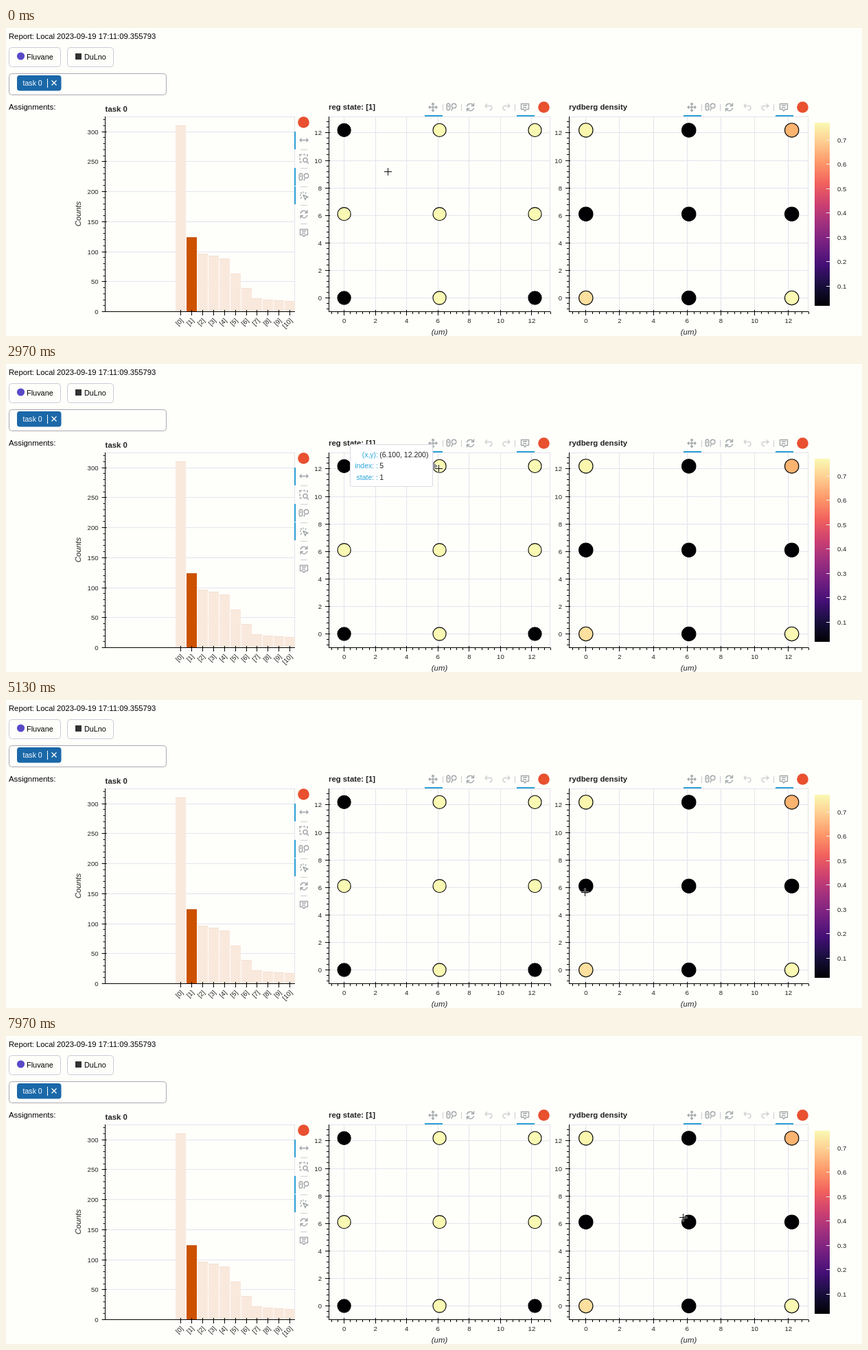
An HTML page with a canvas that plays this animation: 1247 by 449 pixels, repeating every 8 s.

```html
<!DOCTYPE html>
<html lang="en">
<head>
<meta charset="utf-8">
<title>Task report</title>
<style>
html, body { margin: 0; width: 100%; height: 100%; overflow: hidden; background: #fefefb; }
canvas { display: block; }
</style>
</head>
<body>
<canvas id="stage" width="1247" height="449"></canvas>
<script>
const ctx = document.getElementById('stage').getContext('2d');
const LOOP = 8000, BG = '#fefefb', INK = '#000', LABEL = '#222', GRID = '#e3e3ec', ICON = '#a1a6a9', BLUE = '#2b9fd6';
const YELLOW = '#faf9b4', BLACK = '#010003';
const TOP = 129, BASE = 413.5;
const COUNTS = [310, 124, 97, 93, 89, 64, 40, 22, 20, 19, 18];
const MAGMA = ['#000004', '#180f3d', '#440f76', '#721f81', '#9e2f7f', '#cd4071', '#f1605d', '#fd9668', '#feca8d', '#faf9b4'];
const SITES = [0, 6.1, 12.2];

// Colours run column by column, each from the bottom up.
const register = { x0: 470, x1: 793, zero: 492.6, unit: 22.78, r: 9.6, title: 'reg state: [1]', tools: 622,
  fills: [BLACK, YELLOW, BLACK, YELLOW, YELLOW, YELLOW, BLACK, YELLOW, YELLOW] };
const density = { x0: 820, x1: 1169, zero: 844.8, unit: 24.58, r: 10.2, title: 'rydberg density', tools: 999,
  fills: ['#fddf9f', BLACK, '#faf6ae', BLACK, BLACK, BLACK, YELLOW, BLACK, '#fbb370'] };

// Pointer stops: time, x, y
const STOPS = [[0, 557, 210], [30, 557, 210], [800, 492, 271], [1500, 492, 271], [2500, 631, 153], [3300, 631, 153],
  [4130, 631, 287], [4300, 631, 287], [5130, 844, 281], [5900, 844, 279], [6930, 968, 166], [7970, 987, 265], [8000, 987, 265]];

const yOf = v => 393.5 - v * 20.05;
const countY = v => BASE - v * 0.875;

function text(s, x, y, size = 11.25, color = INK, align = 'left', style = '') {
  ctx.font = `${style} ${size}px "Liberation Sans", Arial, sans-serif`;
  ctx.fillStyle = color;
  ctx.textAlign = align;
  ctx.fillText(s, x, y);
}

function line(color, width, ...p) {
  ctx.strokeStyle = color;
  ctx.lineWidth = width;
  ctx.beginPath();
  for (let i = 0; i < p.length; i += 2) ctx.lineTo(p[i], p[i + 1]);
  ctx.stroke();
}

const snap = v => Math.floor(v) + 0.5;
const hLine = (color, x0, x1, y) => line(color, 1, x0, snap(y), x1, snap(y));
const vLine = (color, x, y0, y1) => line(color, 1, snap(x), y0, snap(x), y1);

function disc(x, y, r, fill, stroke) {
  ctx.beginPath();
  ctx.arc(x, y, r, 0, 7);
  ctx.fillStyle = fill;
  ctx.fill();
  if (stroke) { ctx.strokeStyle = stroke; ctx.lineWidth = 1.1; ctx.stroke(); }
}

function box(x, y, w, h, r, stroke, fill) {
  ctx.beginPath();
  ctx.roundRect(x, y, w, h, r);
  if (fill) { ctx.fillStyle = fill; ctx.fill(); }
  if (stroke) { ctx.strokeStyle = stroke; ctx.lineWidth = 1; ctx.stroke(); }
}

const ICONS = {
  pan: 'M-6 0H6M0-6V6M-4-2L-6 0L-4 2M4-2L6 0L4 2M-2-4L0-6L2-4M-2 4L0 6L2 4',
  xpan: 'M-6 0H6M-3.5-2.5L-6 0L-3.5 2.5M3.5-2.5L6 0L3.5 2.5',
  zoomBox: 'M-6-3V-6H-3M-1-6H2M4-6H5V-3M-6-1V2M-6 4V5H-3M5 2A3 3 0 1 1-1 2A3 3 0 1 1 5 2M4 4L7 7',
  wheel: 'M-4.5-5.5A2.3 2.3 0 0 1-2.2-3V2A2.3 2.3 0 0 1-6.8 2V-3A2.3 2.3 0 0 1-4.5-5.5M-4.5-3V0M6.8-2A3.2 3.2 0 1 1 .4-2A3.2 3.2 0 1 1 6.8-2M1.5 1L0 5',
  tap: 'M-1-1L6 2L3 3L2 6ZM-1-6V-4M-6-1H-4M-5-5L-3-3M3-5L2-3M-5 4L-3 2',
  reset: 'M-5-1A5 5 0 0 1 4-3M5-6V-2H1M5 1A5 5 0 0 1-4 3M-5 6V2H-1',
  undo: 'M-2-5L-5-2L-2 1M-5-2H2A3 3 0 0 1 2 4H1',
  redo: 'M2-5L5-2L2 1M5-2H-2A3 3 0 0 0-2 4H-1',
  hover: 'M-5.5-5H5.5V3H2L0 5.5L-2 3H-5.5ZM-3-2.5H3M-3 .5H2'
};
for (const k in ICONS) ICONS[k] = new Path2D(ICONS[k]);

function icon(name, x, y, color = ICON) {
  ctx.save();
  ctx.translate(x, y);
  ctx.strokeStyle = color;
  ctx.lineWidth = 1.4;
  ctx.lineJoin = 'round';
  ctx.stroke(ICONS[name]);
  ctx.restore();
}

function header() {
  text('Report: Local 2023-09-19 17:11:09.355793', 4, 15.5);
  box(4.5, 28.5, 75, 28, 4, '#cbcbd8');
  disc(21.5, 41, 5.6, '#5a4ac8');
  text('Fluvane', 30, 46, 10.9);
  box(89.5, 28.5, 67, 28, 4, '#cbcbd8');
  box(101, 37, 9, 9, 0, null, '#333');
  text('DuLno', 114, 46, 10.8);
  box(4.5, 66.5, 229, 31, 4, '#aaaab2');
  box(16, 69, 64.5, 22.5, 4, null, '#1b68a9');
  text('task 0', 24.5, 83.5, 10.6, '#fff');
  vLine('#fff', 60, 74, 87);
  line('#fff', 1.2, 66.5, 76.5, 73.5, 83.5);
  line('#fff', 1.2, 73.5, 76.5, 66.5, 83.5);
  text('Assignments:', 4, 118.5, 11.4);
}

function valueAxis(x, low, high, minor, toY) {
  vLine(INK, x, TOP, BASE);
  for (let i = Math.ceil(low / minor); i * minor <= high; i++) {
    const y = toY(i * minor), major = i % 5 === 0;
    hLine(INK, x - (major ? 5 : 3), x + (major ? 2 : 0), y);
    if (major) text(i * minor, x - 10, y + 3.5, 9.6, LABEL, 'right');
  }
}

function histogram() {
  const x0 = 144.6, x1 = 421;
  text('task 0', x0, 122, 11.35, LABEL, 'left', 'bold');
  for (let v = 50; v <= 300; v += 50) hLine(GRID, x0, x1, countY(v));
  hLine(GRID, x0, x1, TOP);
  vLine(GRID, x1 - 1, TOP, BASE);
  COUNTS.forEach((n, i) => {
    const x = Math.round(247 + 15.92 * i), y = Math.round(countY(n));
    ctx.fillStyle = i === 1 ? '#cc5200' : '#f9e9dd';
    ctx.fillRect(x, y, Math.min(15, x1 - x), BASE - y);
    if (i !== 1) hLine('#f5dfd0', x, Math.min(x + 15, x1), y);
  });
  valueAxis(x0, 0, 325, 10, countY);
  hLine(INK, x0, x1, BASE);
  COUNTS.forEach((_, i) => {
    const x = 254.5 + 15.92 * i;
    vLine(INK, x, 411, 419);
    ctx.save();
    ctx.translate(x + 3, 426);
    ctx.rotate(-Math.PI / 4);
    text(`[${i}]`, 0, 1.5, 9.6, LABEL, 'right');
    ctx.restore();
  });
  ctx.save();
  ctx.translate(109, 271);
  ctx.rotate(-Math.PI / 2);
  text('Counts', 0, 0, 11.6, LABEL, 'center', 'italic');
  ctx.restore();

  disc(433.5, 137.5, 8.3, '#e8502f');
  ['xpan', 'zoomBox', 'wheel', 'tap', 'reset', 'hover'].forEach((name, i) => {
    icon(name, 434, 163.5 + 27 * i);
    if (i) hLine('#d0d0d4', 429, 439, 150 + 27 * i);
  });
  for (const [y0, y1] of [[151, 177], [204, 230], [231, 257]]) line(BLUE, 2, 421, y0, 421, y1);
}

function toolbar(x) {
  const y = 115.5;
  [['pan', 0], ['wheel', 27], ['reset', 54.5], ['undo', 81], ['redo', 107], ['hover', 134]].forEach(([name, dx]) =>
    icon(name, x + dx, y, /undo|redo/.test(name) ? '#cfd2d3' : ICON));
  for (const dx of [14, 41, 119]) vLine('#ccccd0', x + dx, 111, 121);
  for (const dx of [-12, 122]) line(BLUE, 2, x + dx, 128, x + dx + 26, 128);
  disc(x + 161.5, y, 8.3, '#e8502f');
}

function lattice(p) {
  const xOf = v => p.zero + v * p.unit;
  text(p.title, p.x0, 119, 11.35, LABEL, 'left', 'bold');
  for (let v = 0; v <= 12; v += 2) {
    hLine(GRID, p.x0, p.x1, yOf(v));
    vLine(GRID, xOf(v), TOP, BASE);
  }
  hLine(GRID, p.x0, p.x1, TOP);
  vLine(GRID, p.x1 - 1, TOP, BASE);
  valueAxis(p.x0, -1, 13.2, 0.4, yOf);
  hLine(INK, p.x0, p.x1, BASE);
  for (let i = -2; i <= 33; i++) {
    const x = xOf(i * 0.4), major = i % 5 === 0;
    vLine(INK, x, major ? 411 : BASE, major ? 419 : 417);
    if (major) text(i * 0.4, x, 430, 9.6, LABEL, 'center');
  }
  text('(um)', (p.x0 + p.x1) / 2, 447, 11.35, LABEL, 'center', 'italic');
  p.fills.forEach((fill, i) =>
    disc(xOf(SITES[i / 3 | 0]), yOf(SITES[i % 3]), p.r, fill, '#000'));
  toolbar(p.tools);
}

function colorBar() {
  const g = ctx.createLinearGradient(0, 405, 0, 138);
  MAGMA.forEach((c, i) => g.addColorStop(i / 9, c));
  ctx.fillStyle = g;
  ctx.fillRect(1178, 138, 22, 267);
  for (let i = 1; i < 8; i++) {
    const y = 411.7 - 35.5 * i;
    hLine('#eee', 1195, 1200, y);
    text((i / 10).toFixed(1), 1211, y + 3.5, 9.6, LABEL);
  }
}

function tooltip(i) {
  const sx = SITES[i / 3 | 0], sy = SITES[i % 3];
  const x = register.zero + sx * register.unit, y = yOf(sy);
  const num = v => v ? v.toFixed(3) : '0';
  const coords = `(${num(sx)}, ${num(sy)})`;
  ctx.font = '10.5px "Liberation Sans", Arial, sans-serif';
  const w = Math.round(ctx.measureText(coords).width + 50);
  const side = sx ? -1 : 1, edge = Math.round(x + side * 9.5);
  const left = side > 0 ? edge : edge - w;
  box(left + 0.5, snap(y - 31), w - 1, 61, 1, '#d8d8e6', '#fff');
  ctx.beginPath();
  ctx.moveTo(edge, y - 6);
  ctx.lineTo(edge - side * 7, y);
  ctx.lineTo(edge, y + 6);
  ctx.fillStyle = '#909096';
  ctx.fill();
  const state = register.fills[i] === YELLOW ? 1 : 0;
  [['(x,y):', coords], ['index: :', i], ['state: :', state]].forEach(([name, value], row) => {
    const ty = y - 13 + 16.6 * row;
    text(name, left + 41, ty, 10.5, '#2ba6dc', 'right');
    text(value, left + 43.2, ty, 10.5, LABEL);
  });
}

function pointer(t) {
  const k = STOPS.findIndex(s => s[0] > t);
  const [t0, x0, y0] = STOPS[k - 1], [t1, x1, y1] = STOPS[k];
  const u = (t - t0) / (t1 - t0), e = u * u * (3 - 2 * u);
  return [x0 + (x1 - x0) * e, y0 + (y1 - y0) * e];
}

function cross(x, y) {
  x = Math.round(x) - 0.5;
  y = Math.round(y) - 0.5;
  for (const [color, width, arm] of [['rgba(255,255,255,.75)', 2.4, 6], ['#111', 1, 5.5]]) {
    line(color, width, x - arm, y, x + arm, y);
    line(color, width, x, y - arm, x, y + arm);
  }
}

function draw() {
  const [x, y] = pointer(performance.now() % LOOP);
  ctx.fillStyle = BG;
  ctx.fillRect(0, 0, 1247, 449);
  header();
  histogram();
  lattice(register);
  lattice(density);
  colorBar();
  const hit = register.fills.findIndex((_, i) =>
    Math.hypot(x - register.zero - SITES[i / 3 | 0] * register.unit, y - yOf(SITES[i % 3])) < 9);
  if (hit >= 0) tooltip(hit);
  cross(x, y);
  requestAnimationFrame(draw);
}
draw();
</script>
</body>
</html>
```
